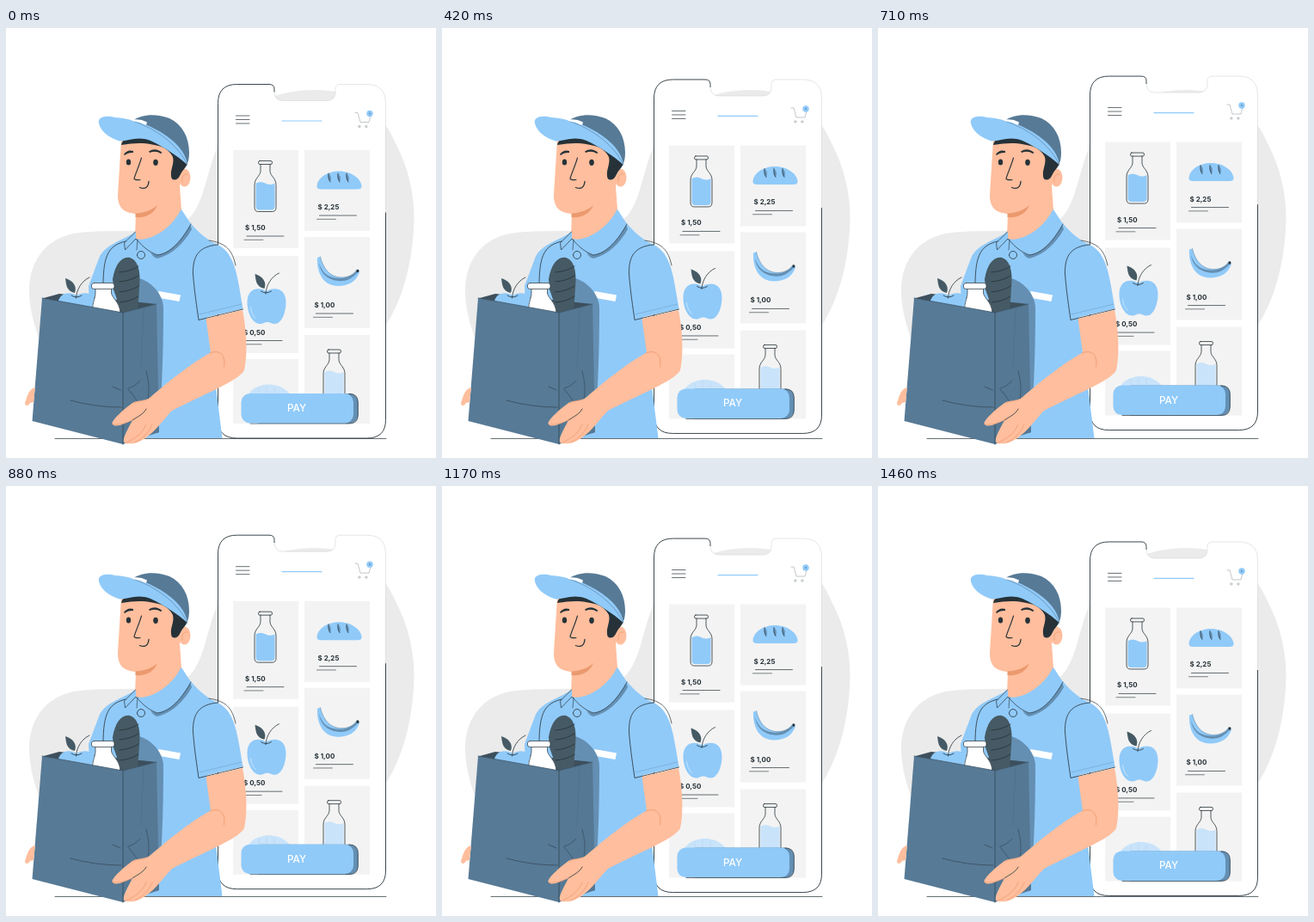
An HTML page with a canvas that plays this animation: 500 px wide and 500 px high, repeating every 1.5 s.

```html
<!DOCTYPE html>
<html lang="en">
<head>
<meta charset="utf-8">
<title>Grocery delivery</title>
<style>
  html, body { margin: 0; width: 100%; height: 100%; overflow: hidden; background: #fff; }
  canvas { display: block; width: 500px; height: 500px; }
</style>
</head>
<body>
<canvas id="stage" width="500" height="500"></canvas>
<script>
const ctx = document.getElementById('stage').getContext('2d');
const LOOP = 1500, STEP = 1000 / 24, LIFT = 10;
const BLUE = '#90caf9', SHADE = '#648fb2', SLATE = '#577a96', CREASE = '#354c5d', INK = '#263238',
      LEAF = '#455a64', SKIN = '#ffbe9d', BLUSH = '#eb996e', PALE = '#c8e3fa';

const fill = (d, color) => { ctx.fillStyle = color; ctx.fill(new Path2D(d)); };
const line = (d, width = 0.8, color = INK) => {
  ctx.strokeStyle = color;
  ctx.lineWidth = width;
  ctx.stroke(new Path2D(d));
};
const box = (x, y, w, h, color, r = 0) => {
  ctx.beginPath();
  ctx.roundRect(x, y, w, h, r);
  ctx.fillStyle = color;
  ctx.fill();
};
const oval = (x, y, rx, ry, color) => {
  ctx.beginPath();
  ctx.ellipse(x, y, rx, ry, 0, 0, Math.PI * 2);
  ctx.fillStyle = color;
  ctx.fill();
};
const text = (s, x, y, size, weight, color) => {
  ctx.font = `${weight} ${size}px Inter, sans-serif`;
  ctx.fillStyle = color;
  ctx.fillText(s, x, y);
};
const at = (x, y, draw) => {
  ctx.save();
  ctx.translate(x, y);
  draw();
  ctx.restore();
};

function backdrop() {
  ctx.fillStyle = '#fff';
  ctx.fillRect(0, 0, 500, 500);
  fill(`M300 84C325 72 360 69 388 75C420 82 440 105 452 132C469 164 475 195 474.5 224
    C473 275 460 322 436 354L250 400L60 400C42 376 27 338 27 305C27 268 50 243 82 238.5
    C122 233 175 241 206 226C232 212 232 162 250 130Z`, '#ebebeb');
  line('M57 477.5H442', 0.7);
}

function price(label, x, y) {
  text(label, x, y, 8, 700, INK);
  line(`M${x + 2} ${y + 7}h43`, 0.7);
  line(`M${x - 1} ${y + 11.3}h22`, 0.6);
}

// Origin: top centre of the cap.
function milk(liquid) {
  fill('M-11 26Q-5 23 0 26Q6 29 11 26V53Q11 57 7 57H-7Q-11 57 -11 53Z', liquid);
  line(`M-5.5 4V12C-6 18 -12.5 20 -12.5 28V54Q-12.5 59 -8 59H8
    Q12.5 59 12.5 54V28C12.5 20 6 18 5.5 12V4`);
  line('M-6.5 0H6.5Q8 0 8 2T6.5 4H-6.5Q-8 4 -8 2T-6.5 0Z');
}

function loaf(color) {
  fill('M0 18C0 8 12 0 26 0C40 0 52 9 52 18Q52 21 47 21H5Q0 21 0 18Z', color);
}

function apple() {
  fill(`M22 5C15 0 0 0 0 18C0 32 7 43 15 43C19 43 20 41 23 41C27 41 28 43 32 43
    C40 43 45 30 45 18C45 0 30 0 22 5Z`, BLUE);
  line('M16 5Q22 9 28 5M21.5 8C22 -2 28 -12 37 -16');
  fill('M20 2C10 0 10 -8 9 -15C18 -12 23 -6 20 2Z', LEAF);
  line('M4 24Q5 33 10 37', 0.8, '#d3eafd');
}

function banana() {
  fill(`M362 267L365.5 266C369 281 378 290 390 290C398 290 404 287 408 281L411 284
    C407 295 398 300 386 300C370 300 361 286 362 267Z`, BLUE);
  fill(`M364 273C368 287 378 292 391 291C398 290 404 287 408 282L409 284
    C401 293 394 295 386 294C373 293 365 284 364 273Z`, SHADE);
  line('M365.5 266C369 281 378 290 390 290C398 290 404 287 408 281', 0.5, SLATE);
  oval(409, 282.5, 1.5, 1.8, INK);
}

function phone() {
  const faint = `M312 74Q312 84.5 322 84.5H373Q383 84.5 383 74V71Q383 65.5 389 65.5H419.5
    Q441.5 65.5 441.5 87.5V215`;
  const strong = `V455.5Q441.5 477 419.5 477H268.5Q246.5 477 246.5 455.5V87.5
    Q246.5 65.5 268.5 65.5H306Q312 65.5 312 71V74`;
  fill(faint + strong, '#fff');
  line(faint, 0.6, '#d2d5d7');
  line('M441.5 215' + strong, 0.9);

  line('M267.5 102H283M267.5 106.5H283M267.5 111H283', 0.7);
  line('M321 108H367', 1.2, BLUE);
  line('M406 98.5H409L412 109.5H422L424 102', 0.6, '#9ba1a5');
  for (const x of [411, 419])
    line(`M${x - 1.2} 114.5a1.2 1.2 0 1 0 2.4 0a1.2 1.2 0 1 0 -2.4 0`, 0.5, '#7d868b');
  oval(423, 99.5, 3.7, 3.7, BLUE);
  oval(423, 99.5, 0.8, 1.2, SHADE);

  for (const [x, y, h] of [[264, 142, 114], [347, 142, 94], [347, 243, 106],
                           [264, 265, 113], [347, 357, 103], [264, 385, 75]])
    box(x, y, 76, h, '#f3f3f3');

  at(301.5, 154.5, () => milk(BLUE));
  price('$ 1,50', 278, 235);
  at(361.5, 166.5, () => loaf(BLUE));
  for (const x of [375, 386, 396]) {
    fill(`M${x} 169Q${x + 4.5} 173 ${x + 2} 179Q${x - 1} 176 ${x} 169Z`, SHADE);
    line(`M${x} 169Q${x - 1} 175 ${x + 2} 179`, 0.7);
  }
  price('$ 2,25', 362.5, 211);
  banana();
  price('$ 1,00', 358.5, 325);
  at(280.5, 301, apple);
  price('$ 0,50', 276, 356.5);
  at(381.5, 374, () => milk(PALE));
  at(280, 414.5, () => loaf(PALE));
  line('M294 418v8M303 416v9M312 418v8', 0.6, '#b5d7f3');

  box(285, 425, 124.5, 35, SHADE, 10);
  line('M399 425.3Q409.3 425.3 409.3 435V450Q409.3 460 399 460H284', 0.7);
  box(273.5, 425, 130.5, 34.5, BLUE, 10);
  text('PAY', 327, 446, 11.7, 500, '#fff');
}

function head() {
  oval(207.5, 174, 7, 10.5, SKIN);
  fill(`M134 130L131.5 170L130 194C130 208 136 215 151 216L150 243C158 258 190 240 204 211
    L202 184L206 160L190 130Z`, SKIN);
  fill('M150.5 215.5C162 215 171 211 176 206C172 216 163 221 150.5 220Z', BLUSH);
  line('M205 179C204 172 207 169 211 170', 0.7, BLUSH);
  fill(`M134 136C136 124 160 122 176 130C192 137 204 148 211 158C208 164 205 165 202 172
    C199 178 192 178 192 172C191 164 196 158 194 150C189 140 180 137 170 135.5
    C157 133 148 134 134 136Z`, INK);
  fill(`M147 108C157 100 175 99 190 105C205 112 213 127 213 145C213 151 212 156 210 159
    C200 140 175 119 147 108Z`, SLATE);
  fill(`M108 111C106 104 115 101 127 104C142 105 162 110 180 121C199 133 209 145 211 159
    C198 148 185 139 168 131C152 125 142 132 132 131.5C119 127 110 120 108 111Z`, BLUE);
  line('M147 108C175 117 200 136 211 159', 0.6, SLATE);
  fill('M147 106.5Q156 105 164 109.5L163 113Q155 109 146 108Z', '#fff');
  oval(142.5, 156, 2.7, 3.6, INK);
  oval(174, 156.3, 2.8, 3.6, INK);
  fill('M137 147Q141 141 148 143V145Q142 144.5 138 148Z', INK);
  fill('M166 143.5Q174 138.5 181.5 145L180 146Q174 142 167 145Z', INK);
  line('M157.5 151C155 160 151 168 149 175Q149.5 177 156 176.5', 1.1);
  line('M155.5 185.5Q165 189 166 178.5', 1.3);
}

function shirt() {
  fill(`M150 237C140 246 114 251 108 268L96 300L100 400L160 477H251.5L234 336L275.5 326.5
    C268 280 265 259 242 250C232 245 222 236 213 225L204 211L150 243Z`, BLUE);
  line('M139 248C120 253 113 262 113 300');
  line('M246 252C224 254 217 265 217.5 286C219 306 222 325 224 339.5L275.5 327');
  line('M236 247C256 250 263 258 267 276', 0.7);
  line('M224.5 333L274 321', 0.4, SHADE);
}

function collar() {
  fill('M214 228L216 234C207 250 193 264 176 268C170 267 166 258 163 251Z', SHADE);
  fill(`M203.5 211L215 228C205 246 192 262 176 264C166 262 158 254 151 245
    C162 249 190 238 203.5 211Z`, BLUE);
  fill('M151 237L137.5 251L139 258Q146 261 151 246Z', BLUE);
  line('M215 228C205 246 192 262 176 264C165 260 158 253 151 245L138.5 258L137.5 250L150.5 237', 0.7);
  line('M152.5 264a4.5 4.5 0 1 0 9 0a4.5 4.5 0 1 0 -9 0');
  line('M153 246L152 258', 0.6);
  fill('M177.5 306L203 310.5L201.5 318L176 313.5Z', '#fff');
}

function bag() {
  fill('M150 290C166 292 183 308 183 326C183 380 181 430 177 471L150 470Z', SHADE);
  fill('M42 314.5L62 309L175 321L136 332Z', '#3d4f5c');

  at(60, 306, apple);
  fill('M124 292C127 274 135 265 144 267C154 270 157 284 155 302L153 330H134L125 304Z', LEAF);
  for (const y of [280, 291, 303, 315])
    line(`M132 ${y + 4}Q145 ${y + 3} 154 ${y - 3}`);
  fill('M104 302V308C104 314 100 318 100 330H133C132 318 123 314 122.5 308V302Z', '#fff');
  line('M104 303V308C104 314 101 318 100.5 327M122.5 303V308C123 314 132 318 133 331', 0.7);
  box(99.5, 296.5, 26.5, 7, '#fff', 3);
  line(`M102.5 296.5H123Q126 296.5 126 299V301Q126 303.5 123 303.5H102.5
    Q99.5 303.5 99.5 301V299Q99.5 296.5 102.5 296.5Z`, 0.7);

  fill('M42 314L136 331V484L30.5 457Z', SLATE);
  fill('M136 331L175 321L178 470L136 484Z', '#557894');
  line('M42 314L136 331L175 321', 0.8, '#3f596d');
  line('M136 331V484', 0.9, CREASE);
  line('M75 433Q104 441 134 441M124 417L133 421', 0.8, CREASE);
  line('M142 419Q150 417 156 410M163 399Q168 417 165 432M152 433Q146 424 142 420', 0.7, CREASE);
  line('M160 326L157 395', 0.5, '#4b6a82');
  fill('M34 418C26 420 25 428 22 436C22 440 26 440 28 436L32 435Z', SKIN);
}

function arm() {
  fill(`M232.5 338L275 328C280 352 281 382 277 398C270 411 225 428 193 445
    C184 454 176 466 167 473C157 482 146 485 138 482.5C134 479 141 468 147 456
    C137 460 127 466 123.5 460C123 456 137 443 147 436C154 432 160 435 167 430
    C190 410 218 388 238 377.5Z`, SKIN);
  line('M237 378C249 373 256 381 253.5 394', 0.8, BLUSH);
  line('M147 456C153 452 160 449 163 443');
  line('M124 461Q135 462 147 456M163 432Q154 434 148 436', 0.6, BLUSH);
  line('M140 482C151 477 159 471 163 461M150 482C160 477 167 469 170 461', 0.7, BLUSH);
}

function draw(time) {
  // The phone rises and falls linearly, held at 24 steps per second.
  const step = Math.floor((time % LOOP) / STEP + 0.1);
  const phase = step * STEP / LOOP;
  const lift = LIFT * (1 - Math.abs(1 - 2 * phase));
  backdrop();
  at(0, -lift, phone);
  shirt();
  head();
  collar();
  bag();
  arm();
}

const start = performance.now();
function tick() {
  draw(performance.now() - start);
  requestAnimationFrame(tick);
}
ctx.lineCap = ctx.lineJoin = 'round';
tick();
</script>
</body>
</html>
```
